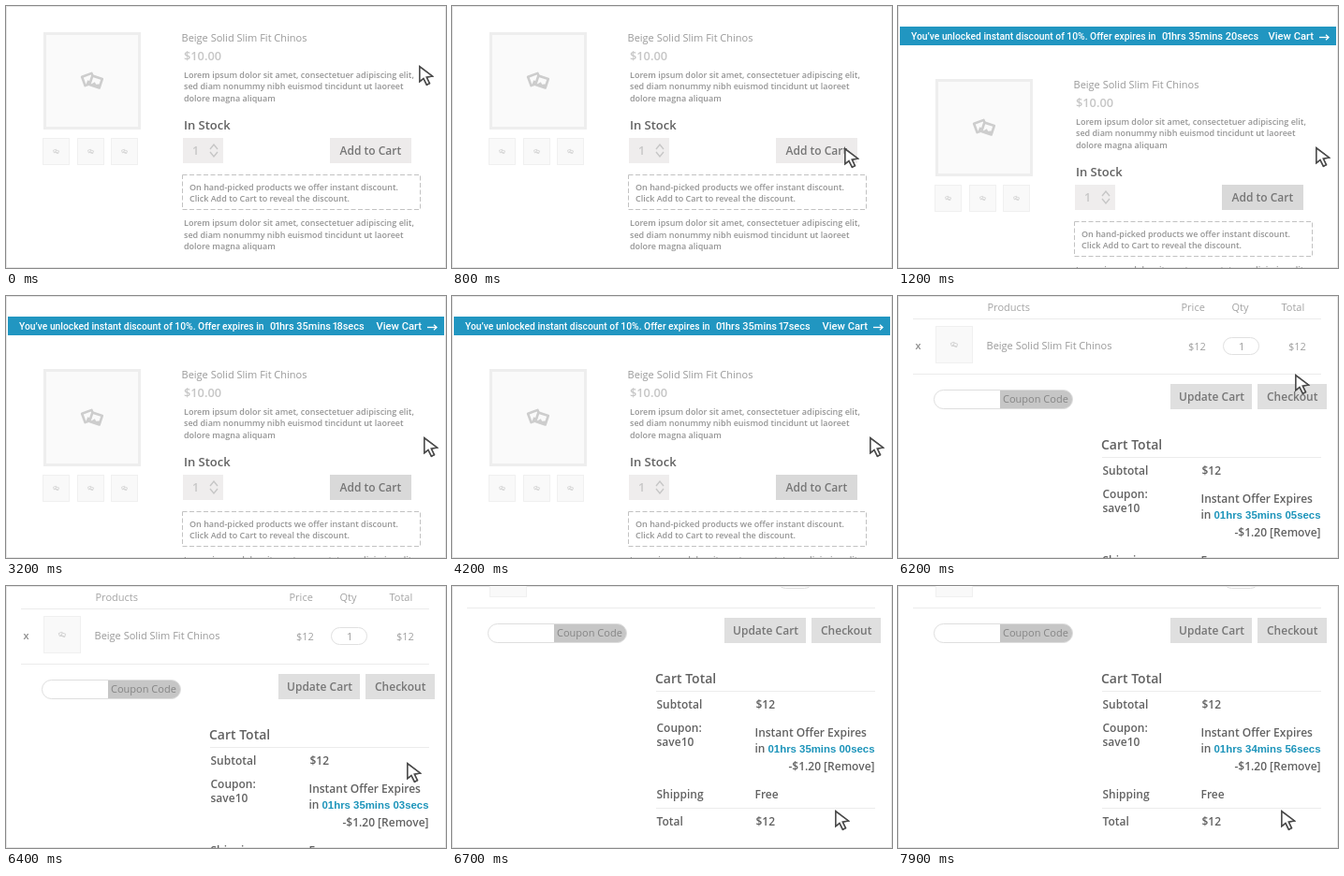
Recreate the animation shown at these times as an HTML page with a canvas. Size 470 px wide and 280 px high, loop 8 s.

```html
<!DOCTYPE html>
<html lang="en">
<head>
<meta charset="utf-8">
<title>Instant discount</title>
<style>
html, body { margin: 0; width: 470px; height: 280px; overflow: hidden; background: #fff; }
canvas { display: block; }
</style>
</head>
<body>
<canvas id="stage" width="470" height="280"></canvas>
<script>
const ctx = document.getElementById('stage').getContext('2d');
const LOOP = 8000;
const SANS = '"Open Sans", sans-serif';
const BANNER = 'Roboto, sans-serif';

// time, x, y of the pointer tip
const POINTER = [
  [0, 441, 63], [200, 436, 83], [400, 427, 99], [600, 419, 122], [800, 419, 151],
  [1200, 446, 150], [5200, 440, 76], [5700, 422, 31],
  [6200, 424, 83], [6300, 426, 136], [6400, 428, 188],
  [6500, 422, 205], [6600, 415, 222], [6700, 409, 239]
];

function text(str, x, y, size, color, weight = 600, family = SANS, align = 'left') {
  ctx.font = `${weight} ${size}px ${family}`;
  ctx.fillStyle = color;
  ctx.textAlign = align;
  ctx.fillText(str, x, y);
}

function rect(x, y, w, h, color) {
  ctx.fillStyle = color;
  ctx.fillRect(x, y, w, h);
}

function frame(x, y, w, h, color, width = 1) {
  ctx.strokeStyle = color;
  ctx.lineWidth = width;
  ctx.strokeRect(x + width / 2, y + width / 2, w - width, h - width);
}

function path(points, color, width, close) {
  ctx.beginPath();
  points.forEach(([x, y]) => ctx.lineTo(x, y));
  if (close) ctx.closePath();
  ctx.strokeStyle = color;
  ctx.lineWidth = width;
  ctx.stroke();
}

function pill(x, y, w, h) {
  ctx.beginPath();
  ctx.roundRect(x + 0.5, y + 0.5, w - 1, h - 1, h / 2);
}

function icon(x, y, scale, color) {
  ctx.save();
  ctx.translate(x, y);
  ctx.scale(scale, scale);
  ctx.lineJoin = 'round';
  for (const [dx, dy, turn] of [[-4, -1.5, -0.35], [4, 1, 0.32]]) {
    ctx.save();
    ctx.translate(dx, dy);
    ctx.rotate(turn);
    rect(-6, -5.5, 12, 11, '#fafafa');
    ctx.strokeStyle = color;
    ctx.lineWidth = 2.6;
    ctx.strokeRect(-5.5, -5, 11, 10);
    ctx.fillStyle = color;
    ctx.beginPath();
    ctx.moveTo(-5, 5);
    ctx.lineTo(-1, 0.5);
    ctx.lineTo(1, 2.5);
    ctx.lineTo(5, 1);
    ctx.lineTo(5, 5);
    ctx.fill();
    ctx.restore();
  }
  ctx.restore();
}

function thumb(x, y, size, iconScale) {
  rect(x, y, size, size, '#f9f9f9');
  frame(x, y, size, size, '#f0f0f0');
  icon(x + size / 2, y + size / 2, iconScale, '#d2d2d2');
}

function lorem(y) {
  text('Lorem ipsum dolor sit amet, consectetuer adipiscing elit,', 190, y, 9, '#959595');
  text('sed diam nonummy nibh euismod tincidunt ut laoreet', 190, y + 12.5, 9, '#959595');
  text('dolore magna aliquam', 190, y + 25, 9, '#959595');
}

function clock(seconds) {
  const pad = n => String(n).padStart(2, '0');
  return `01hrs ${pad(Math.floor(seconds / 60))}mins ${pad(seconds % 60)}secs`;
}

// The digit 1 sits tighter than the other digits
function tightText(str, x, y, size) {
  for (const c of str) {
    const inset = c === '1' ? 1.3 : 0;
    text(c, x - inset, y, size, '#fff', 500, BANNER);
    x += ctx.measureText(c).width - 2 * inset;
  }
}

function product(t) {
  rect(40, 28, 104, 104, '#fafafa');
  frame(40, 28, 104, 104, '#eee', 3);
  icon(92, 80, 1, '#cdcdcd');
  [39, 76, 112].forEach(x => thumb(x, 141, 29, 0.28));

  text('Beige Solid Slim Fit Chinos', 187.5, 38, 11, '#999', 400);
  text('$10.00', 190, 58, 12.8, '#c6c6c6');
  lorem(76.7);
  text('In Stock', 190, 132, 13, '#626262');

  rect(189, 141, 43, 27, '#efeded');
  text('1', 199, 159, 12.5, '#c6c6c6');
  path([[218, 153], [222, 148], [226, 153]], '#c6c6c6', 1.4);
  path([[218, 156], [222, 161], [226, 156]], '#c6c6c6', 1.4);

  rect(346, 141, 87, 27, t < 1000 ? '#edebeb' : '#d9d9d9');
  text('Add to Cart', 356.5, 159, 12, '#767676');

  ctx.setLineDash([5, 2.5]);
  frame(188, 180, 255, 38, '#c2c2c2');
  ctx.setLineDash([]);
  text('On hand-picked products we offer instant discount.', 196, 197, 9, '#959595');
  text('Click Add to Cart to reveal the discount.', 196, 209, 9, '#959595');
  lorem(235);
}

function banner(t) {
  const left = 35 * 60 + 20 - Math.floor((t - 1200) / 1000) - (t >= 5700);
  rect(2, 22, 466, 20, '#2196c1');
  text('You\u2019ve unlocked instant discount of 10%. Offer expires in', 14, 36, 10.3, '#fff', 500, BANNER);
  tightText(clock(left), 282, 36, 11);
  text('View Cart', 395.5, 36, 11.2, t < 5700 ? '#fff' : '#4d4148', 500, BANNER);
  path([[450, 33.5], [460, 33.5]], '#fff', 1.3);
  path([[457, 30.8], [460, 33.5], [457, 36.2]], '#fff', 1.3);
}

function cart(t) {
  const step = Math.floor((t - 6200) / 100);
  const left = 35 * 60 + 5 - Math.min(7, step) - (t >= 7400) - (t >= 7900);
  const dark = '#626262';

  ctx.save();
  ctx.translate(0, -20 * Math.max(0, Math.min(3, step - 2)));

  text('Products', 95.5, 16, 11, '#a4a4a4', 400);
  text('Price', 302.5, 16, 11, '#a4a4a4', 400);
  text('Qty', 356.5, 16, 11, '#a4a4a4', 400);
  text('Total', 409.5, 16, 11, '#a4a4a4', 400);
  rect(16, 24, 436, 1, '#ececec');

  text('x', 18.5, 57, 11, '#8c8c8c');
  thumb(40, 32, 40, 0.34);
  text('Beige Solid Slim Fit Chinos', 94.5, 57, 11, '#999', 400);
  text('$12', 310, 58, 11, '#a0a0a0', 400);
  pill(347, 44, 39, 19);
  ctx.strokeStyle = '#e0e0e0';
  ctx.lineWidth = 1;
  ctx.stroke();
  text('1', 364, 58, 11, '#999', 400);
  text('$12', 417, 58, 11, '#a0a0a0', 400);
  rect(16, 83, 436, 1, '#ececec');

  ctx.save();
  pill(38, 100, 149, 21);
  ctx.clip();
  rect(109, 100, 78, 21, '#c6c6c6');
  ctx.restore();
  pill(38, 100, 149, 21);
  ctx.strokeStyle = '#dedede';
  ctx.lineWidth = 1;
  ctx.stroke();
  text('Coupon Code', 112, 114, 11, '#858585', 400);

  rect(291, 94, 87, 27, '#dfdfdf');
  text('Update Cart', 300, 112, 12, '#767676');
  rect(384, 94, 74, 27, '#dfdfdf');
  text('Checkout', 394, 112, 12, '#767676');

  text('Cart Total', 217, 164, 14, dark);
  rect(218, 172, 234, 1, '#ececec');
  text('Subtotal', 218.5, 191, 12, dark);
  text('$12', 324.5, 191, 12, dark);
  text('Coupon:', 218.5, 216, 12, dark);
  text('save10', 218.5, 231, 12, dark);
  text('Instant Offer Expires', 323.5, 221, 12, dark);
  text('in', 323.5, 238, 12, dark);
  text(clock(left), 337.5, 238, 11.4, '#1c94ba', 700, '"Liberation Sans", Arial, sans-serif');
  text('-$1.20 [Remove]', 451.5, 257, 12, dark, 600, SANS, 'right');
  text('Shipping', 218.5, 287, 12, dark);
  text('Free', 323.5, 287, 12, dark);
  rect(218, 297, 234, 1, '#ececec');
  text('Total', 218.5, 316, 12, dark);
  text('$12', 324.5, 316, 12, dark);
  ctx.restore();
}

function pointer(t) {
  const [, x, y] = POINTER.findLast(p => p[0] <= t);
  ctx.save();
  ctx.translate(x, y);
  ctx.lineJoin = 'miter';
  const shape = [[0.9, 1.8], [0.9, 17.6], [5, 14.4], [8.4, 21.2], [11.4, 19.7], [8.2, 13], [14.4, 12]];
  ctx.fillStyle = '#fff';
  path(shape, '#4a4a4a', 1.5, true);
  ctx.fill();
  path(shape, '#4a4a4a', 1.5, true);
  ctx.restore();
}

function draw() {
  const t = performance.now() % LOOP;
  rect(0, 0, 470, 280, '#fff');
  frame(0, 0, 470, 280, '#e6e6e6');
  if (t < 6200) {
    const open = t >= 1200;
    ctx.save();
    if (open) ctx.translate(0, 50);
    product(t);
    ctx.restore();
    if (open) banner(t);
  } else {
    cart(t);
  }
  pointer(t);
  requestAnimationFrame(draw);
}

draw();
</script>
</body>
</html>
```
